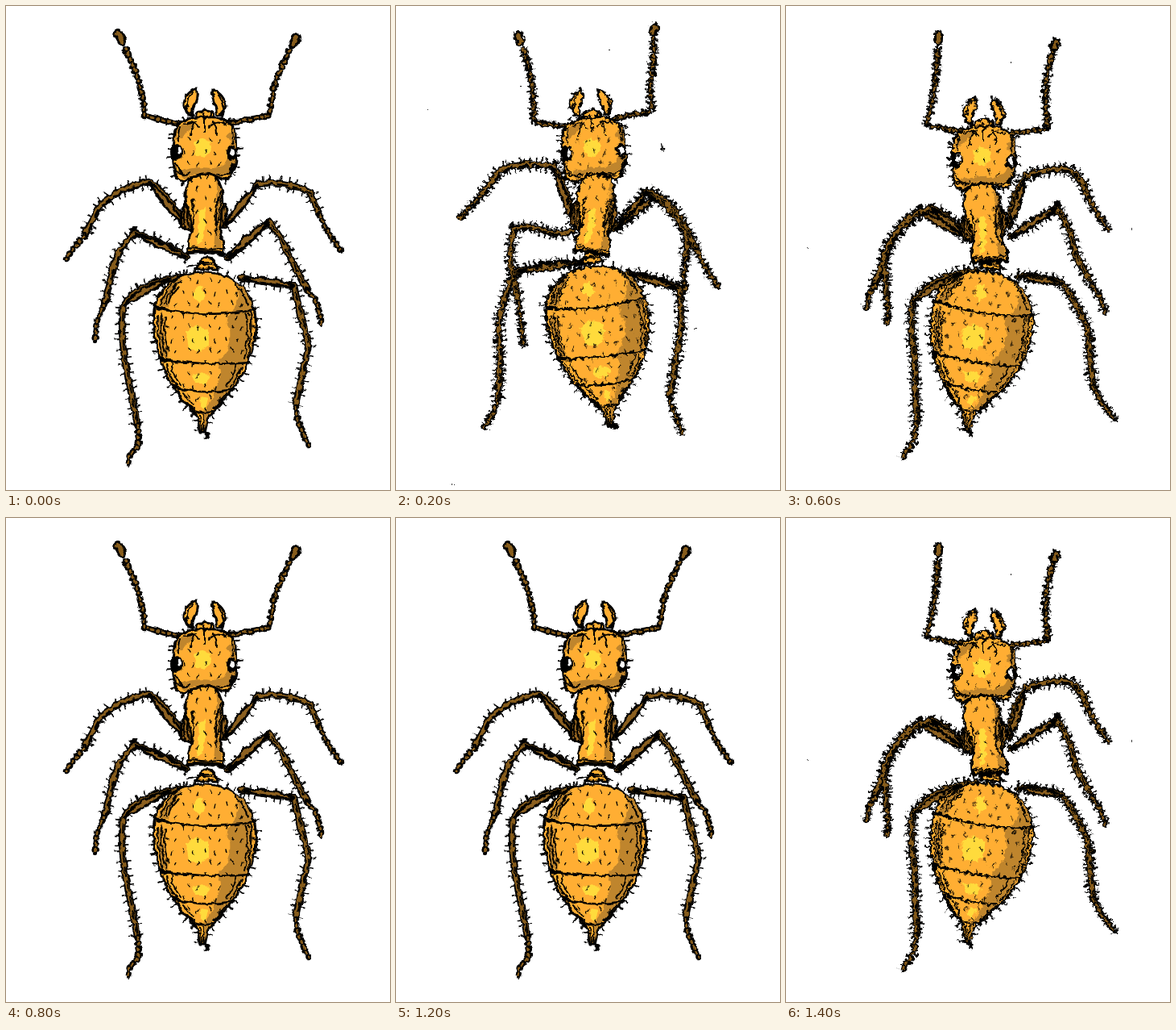
An HTML page without scripts that plays this animation: 477x600 px, repeating every 1.6 s.

```html
<!DOCTYPE html>
<html lang="en">
<head>
<meta charset="utf-8">
<title>Walking ant</title>
<style>
html, body { margin: 0; width: 100%; height: 100%; overflow: hidden; background: #fff }
svg { display: block; width: 100%; height: 100% }
path, use { stroke-linejoin: round }

.hair, .ink, .skin, .line, .edge { fill: none; stroke: #000 }
.hair { stroke-width: 18; stroke-dasharray: 1.6 9 1.6 6 1.8 11 }
.fuzz { stroke-width: 17; stroke-dasharray: 2.2 4.5 1.6 3.5 2.6 6 }
.ink { stroke-width: 8.5; stroke-linecap: round }
.skin { stroke: #865c1c; stroke-width: 4.6; stroke-linecap: round }
.femur { fill: #8c6020; stroke: #000; stroke-width: 2.8 }
.grain { stroke-width: 1.5; stroke-dasharray: 11 7 }
.cord { stroke-width: 4 }
.bead { stroke-width: 8.6; stroke-dasharray: .1 7 }
.core { stroke-width: 2.8; stroke-dasharray: 2.5 4.6 }
.horn { stroke-width: 7 }
.club { stroke-width: 12 }
.clubcore { stroke-width: 6 }

.body { fill: #ffae33; stroke: #000; stroke-width: 3 }
.edge { stroke-width: 14; stroke-dasharray: 1.8 8 1.8 11 }
.dots { fill: url(#freckles) }
.shade { fill: #bf852d }
.glow { fill: #ffdb3c }
.line { stroke-width: 2; stroke-linecap: round }

.pose { visibility: hidden }
.a { filter: url(#sketch); animation: flip 400ms step-end infinite }
.b { filter: url(#rough); animation: show 800ms step-end -600ms infinite }
.c { filter: url(#rough); animation: show 800ms step-end -200ms infinite }
@keyframes flip { 0% { visibility: visible } 50%, 100% { visibility: hidden } }
@keyframes show { 0% { visibility: visible } 25%, 100% { visibility: hidden } }
</style>
</head>
<body>
<svg viewBox="0 0 477 600">
<defs>
  <filter id="sketch" filterUnits="userSpaceOnUse" x="0" y="0" width="477" height="600" color-interpolation-filters="sRGB">
    <feTurbulence type="fractalNoise" baseFrequency=".12" numOctaves="2" seed="4"/>
    <feDisplacementMap in="SourceGraphic" scale="6" xChannelSelector="R" yChannelSelector="G"/>
  </filter>
  <filter id="rough" filterUnits="userSpaceOnUse" x="0" y="0" width="477" height="600" color-interpolation-filters="sRGB">
    <feTurbulence type="fractalNoise" baseFrequency=".2" numOctaves="2" seed="9"/>
    <feDisplacementMap in="SourceGraphic" scale="8" xChannelSelector="R" yChannelSelector="G"/>
  </filter>
  <pattern id="freckles" width="27" height="29" patternUnits="userSpaceOnUse">
    <path class="line" style="stroke-width:1.4" d="M4 4l1 4M17 7l-1 4M10 18l2 4M23 21l-2 4"/>
  </pattern>

  <path id="skull" d="M209 160Q210 147 222 143Q232 136 246 139Q262 135 273 144Q285 148 285 160L286 182Q287 198 279 207Q281 215 268 215Q257 206 244 208Q231 210 222 217Q209 216 209 200Q205 181 209 160Z"/>
  <g id="head">
    <path class="body" d="M236 102Q220 110 221 123L227 136L232 135Q231 127 235 120Q239 111 236 102ZM257 103Q272 111 273 124L267 136L262 135Q263 127 259 121Q255 112 257 103Z"/>
    <path class="line" d="M224 123Q225 131 229 135M270 124Q269 131 265 135M232 107Q225 115 226 124M262 108Q269 116 269 124"/>
    <path class="body" d="M236 142Q234 130 242 131Q247 124 253 131Q260 131 258 142Z"/>
    <use href="#skull" class="edge"/>
    <use href="#skull" class="body"/>
    <path class="shade" d="M284 152L285 182Q286 198 277 206L268 213Q257 205 244 206Q230 208 222 214L213 206Q232 198 256 201Q275 200 275 186Q282 170 274 160ZM211 166Q212 148 228 144L233 148L221 160Z"/>
    <path class="glow" d="M233 168L242 164L253 168L256 178L247 187L236 184Z"/>
    <path class="dots" d="M216 158H278V205H216Z"/>
    <path class="line" d="M246 141V156M236 143Q230 150 229 160M257 143Q262 150 262 160M222 147Q233 140 240 150M253 150Q262 140 273 148M212 206Q222 212 229 207M262 208Q270 213 278 207M216 150Q213 160 214 168M280 150Q283 160 281 170M211 195Q213 203 219 208M283 195Q281 203 274 209"/>
    <ellipse cx="212" cy="181" rx="7" ry="11"/>
    <ellipse cx="280" cy="182" rx="6" ry="10"/>
    <ellipse cx="215" cy="179" rx="2" ry="4.5" fill="#fff"/>
    <ellipse cx="281" cy="182" rx="3" ry="4.8" fill="#fff"/>
  </g>

  <g id="thorax">
    <path class="body" style="fill:#9b6821" d="M226 240Q214 254 219 274L231 280L267 277Q277 268 273 247L264 238Z"/>
    <path class="body" d="M230 213Q245 203 261 212Q272 228 269 250Q264 272 267 285Q273 297 269 306Q249 303 227 304Q225 291 230 281Q231 265 225 249Q219 229 230 213Z"/>
    <path class="shade" d="M261 215Q270 228 267 250Q261 272 265 285Q270 297 266 303L257 302Q261 286 258 268Q264 240 261 215Z"/>
    <path class="glow" d="M239 253L247 250Q249 274 244 292L236 297Q241 272 239 253Z"/>
    <path class="dots" d="M230 215H263V298H230Z"/>
    <path class="line" d="M230 281Q236 262 231 240M262 284Q257 264 264 238M222 250Q219 262 223 274M226 252Q223 262 227 274M270 246Q268 262 270 272M266 230Q268 250 262 268M229 299Q248 303 268 301"/>
    <path class="line" style="stroke-width:4.5" d="M226 306Q248 303 270 308"/>
  </g>

  <path id="sac" d="M246 330C217 330 190 345 184 376C181 412 190 440 204 466C215 487 229 499 237 508L241 529H247L251 510C268 491 289 469 300 443C312 413 313 386 306 371C298 345 275 330 246 330Z"/>
  <g id="abdomen">
    <path class="body" d="M243 314Q250 309 257 314L263 326H236Z"/>
    <path class="line" d="M226 323Q248 316 269 325M238 318H260"/>
    <use href="#sac" class="edge"/>
    <use href="#sac" class="body"/>
    <path class="shade" d="M287 343Q302 355 306 377Q309 408 298 440Q286 470 251 506L248 524L244 503Q260 490 258 474Q272 457 262 443Q282 424 279 402Q269 390 282 378Q292 362 287 343ZM194 358Q205 341 219 338Q205 353 203 373L187 374ZM188 385L196 386Q193 412 203 437L192 434Z"/>
    <path class="glow" d="M235 349L243 347L248 362L240 368L233 362ZM224 404L236 396L252 401L252 421L241 429L227 426ZM231 458L243 454L255 460L248 468H236ZM242 484L251 486L248 499L241 495Z"/>
    <use href="#sac" class="dots"/>
    <path d="M186 371Q200 376 218 379Q200 380 186 376ZM190 434Q203 439 222 442Q204 444 191 439ZM207 469Q218 474 232 477Q218 478 208 474Z"/>
    <path class="line" style="stroke-width:2.5" d="M187 373Q240 388 309 377M190 437Q245 447 303 442M207 472Q245 483 283 475M229 501Q244 507 259 502"/>
    <path class="line" d="M192 370Q197 350 215 338M197 370Q201 353 218 341M203 367Q205 356 215 348M189 383Q187 410 195 435M193 384Q191 412 200 435M198 386Q195 405 201 425M199 444Q203 460 212 471M205 446Q209 460 217 470M213 477Q221 491 233 500M220 479L232 495M298 381Q303 408 295 438M304 380Q308 405 300 437M293 447Q287 462 279 472M286 447Q283 458 275 468M274 480L258 499M285 345Q297 357 300 371M241 507L243 527M246 507L245 526"/>
  </g>

  <!-- legs: walking segments, then feet and antennae -->
  <path id="legA" d="M222 272Q200 232 178 218Q150 222 118 245L98 283M226 312Q196 292 160 282Q141 297 133 325L123 368M236 334L205 338Q163 345 145 372Q142 410 149 448L163 518M272 272Q295 248 312 221Q345 215 378 231L388 256M275 312Q302 292 326 267Q342 285 352 310L373 350M292 337Q330 344 358 347Q366 385 376 420L360 494"/>
  <path id="toeA" d="M97 285L86 297L75 313M122 370L113 390L110 417M164 520L165 545L154 556L152 570M390 259L398 277L415 302M375 353L387 370L393 396M360 497L364 518L376 545M172 136Q170 95 147 51M328 131Q332 88 354 54"/>
  <path id="hornA" d="M232 146L207 145L176 137M260 146L290 143L325 136"/>
  <path id="clubA" d="M144 43L139 34M356 47L361 39"/>

  <path id="legB" d="M220 268Q214 228 196 199Q160 192 130 203L107 233M220 279Q200 286 180 277Q160 271 148 276Q140 300 143 325L152 365M235 318Q190 317 148 330Q130 365 128 400Q131 445 126 488M275 273L312 229Q342 240 358 272L373 302M272 277L322 236Q350 255 362 288L360 312M288 332Q325 336 352 350Q357 385 352 415L340 485"/>
  <path id="toeB" d="M105 236L94 246L79 264M152 367L155 390L158 421M125 490L121 505L109 523M374 304L385 325L399 347M360 314L357 335L359 355M340 488L347 508L356 530M171 141Q172 90 157 51M318 126Q314 105 318 80T319 39"/>
  <path id="hornB" d="M235 146L205 149L175 145M264 141L290 136L315 131"/>
  <path id="clubB" d="M155 44L152 37M320 32L321 26"/>

  <path id="legC" d="M230 290Q206 262 180 250Q145 265 129 295L110 345M225 288Q200 264 165 255Q134 275 122 310L125 360M235 328L215 331Q175 341 157 368Q154 405 160 440L162 515M278 272Q281 235 297 211Q328 200 352 203Q370 214 375 238M278 286Q310 270 336 250Q354 275 360 310L379 343M288 335Q318 334 344 344Q360 367 375 400L381 470"/>
  <path id="toeC" d="M109 347L103 360L100 374M125 362L127 376L126 394M162 518L158 540L144 561M376 240L386 256L401 278M380 346L390 361L397 382M382 473L393 493L409 513M175 146Q188 100 188 49M325 148Q318 95 332 55"/>
  <path id="hornC" d="M240 157L208 154L177 148M265 159L295 156L323 152"/>
  <path id="clubC" d="M189 43L189 36M333 50L335 45"/>
</defs>

<g class="pose a">
  <use href="#legA" class="hair"/>
  <use href="#legA" class="ink"/>
  <use href="#legA" class="skin"/>
  <path class="femur" d="M222 272Q206 240 178 218Q194 250 222 272ZM226 312Q196 290 160 282Q190 304 226 312ZM205 338Q168 343 145 372Q176 357 205 338ZM272 272Q298 252 312 222Q286 242 272 272ZM275 312Q305 295 326 266Q295 283 275 312ZM295 337Q326 350 358 347Q328 334 295 337Z"/>
  <use href="#legA" class="line grain" x="1" y="1.5"/>
  <use href="#toeA" class="ink cord"/>
  <use href="#toeA" class="ink bead"/>
  <use href="#toeA" class="skin core"/>
  <use href="#hornA" class="ink horn"/>
  <use href="#hornA" class="skin core"/>
  <use href="#clubA" class="ink club"/>
  <use href="#clubA" class="skin clubcore"/>
  <use href="#abdomen"/>
  <use href="#thorax"/>
  <use href="#head"/>
</g>

<g class="pose b">
  <use href="#legB" class="hair fuzz"/>
  <use href="#legB" class="ink"/>
  <use href="#legB" class="skin"/>
  <path class="femur" d="M220 268Q215 231 196 200Q201 237 220 268ZM235 317Q193 331 148 330Q190 315 235 317ZM275 273Q299 256 312 229Q288 246 275 273ZM272 277Q302 262 322 236Q292 250 272 277ZM288 332Q318 349 352 350Q322 333 288 332Z"/>
  <use href="#legB" class="line grain" x="1" y="1.5"/>
  <use href="#toeB" class="hair fuzz" style="stroke-width:12"/>
  <use href="#toeB" class="ink cord"/>
  <use href="#toeB" class="ink bead"/>
  <use href="#toeB" class="skin core"/>
  <use href="#hornB" class="ink horn"/>
  <use href="#hornB" class="skin core"/>
  <use href="#clubB" class="ink club"/>
  <use href="#clubB" class="skin clubcore"/>
  <use href="#abdomen" transform="translate(3 -8) rotate(-8 247 390)"/>
  <use href="#thorax" transform="rotate(6 247 258)"/>
  <use href="#head" transform="rotate(-4 246 190)"/>
  <path class="line" d="M40 128h.1M71 594h.1M265 55h.1M154 100l3 -1M330 172l2 9M371 401l2 -1"/>
</g>

<g class="pose c">
  <use href="#legC" class="hair fuzz"/>
  <use href="#legC" class="ink"/>
  <use href="#legC" class="skin"/>
  <path class="femur" d="M230 290Q210 264 180 250Q200 276 230 290ZM225 288Q199 264 165 255Q191 278 225 288ZM215 331Q180 340 157 368Q188 354 215 331ZM278 272Q296 244 297 212Q280 240 278 272ZM278 286Q311 275 336 250Q303 261 278 286ZM288 335Q315 347 344 344Q317 331 288 335Z"/>
  <use href="#legC" class="line grain" x="1" y="1.5"/>
  <use href="#toeC" class="hair fuzz" style="stroke-width:12"/>
  <use href="#toeC" class="ink cord"/>
  <use href="#toeC" class="ink bead"/>
  <use href="#toeC" class="skin core"/>
  <use href="#hornC" class="ink horn"/>
  <use href="#hornC" class="skin core"/>
  <use href="#clubC" class="ink club"/>
  <use href="#clubC" class="skin clubcore"/>
  <use href="#abdomen" transform="translate(-3 -1) rotate(7 247 390)"/>
  <use href="#thorax" transform="translate(0 11) rotate(-6 247 258)"/>
  <use href="#head" transform="translate(-1 11)"/>
  <path class="line" d="M27 300h.1M430 276h.1M279 70h.1"/>
</g>
</svg>
</body>
</html>
```
